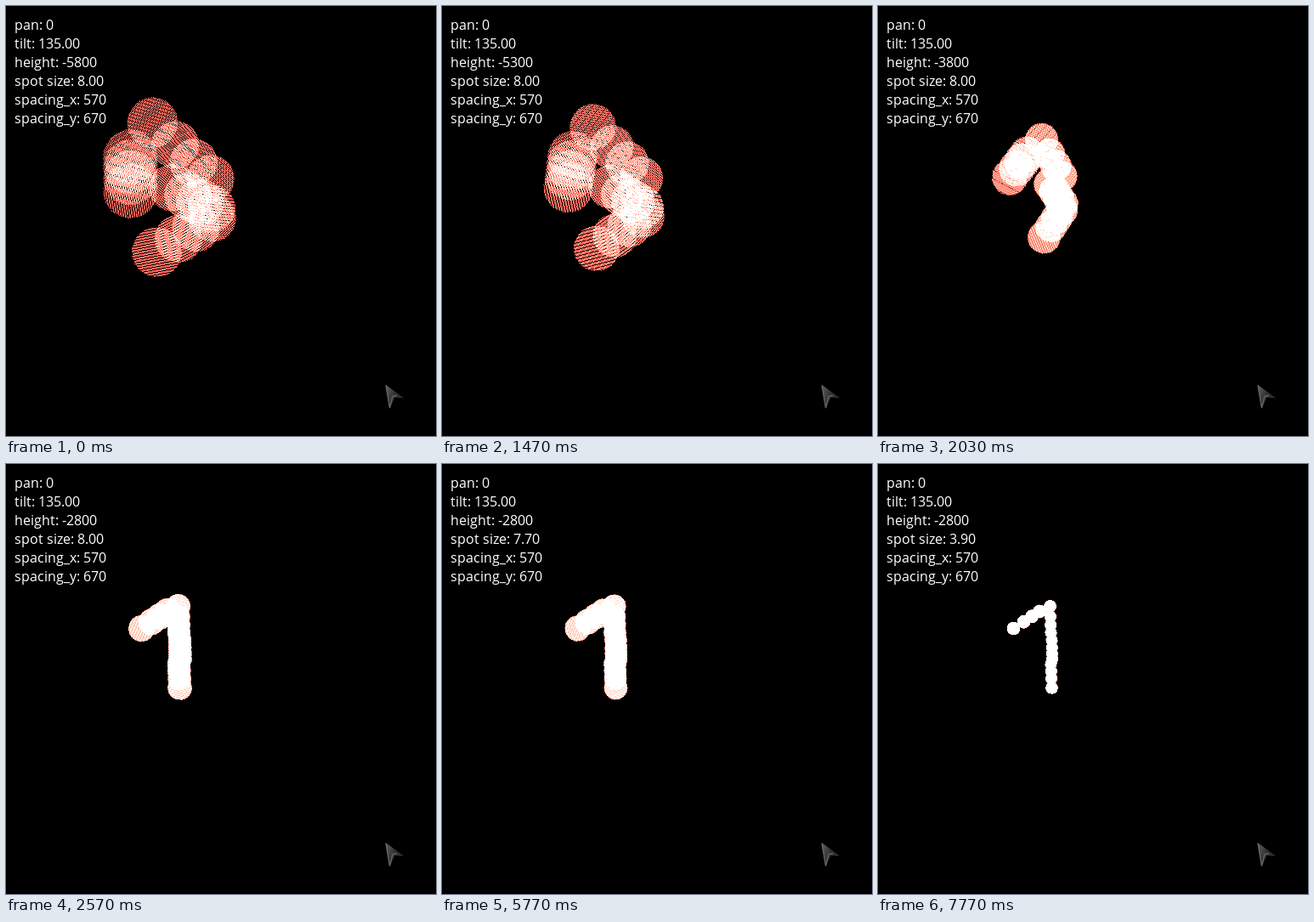
Recreate the animation shown at these times as an HTML page with a canvas. Size 506 by 506 pixels, loop 8000 ms.

```html
<!DOCTYPE html>
<html lang="en">
<head>
<meta charset="utf-8">
<style>
  html, body { margin: 0; width: 100%; height: 100%; overflow: hidden; background: #000; }
  body { position: relative; }
  canvas, svg { position: absolute; left: 0; top: 0; width: 506px; height: 506px; }
  text { font: 16px "Open Sans", "Noto Sans", sans-serif; fill: #fff; white-space: pre; }
</style>
</head>
<body>
<canvas id="beams" width="506" height="506"></canvas>
<svg viewBox="0 0 506 506">
  <defs>
    <linearGradient id="metal" x1="0" y1="0" x2="1" y2="0.6">
      <stop offset="0" stop-color="#666"/>
      <stop offset="0.5" stop-color="#333"/>
      <stop offset="1" stop-color="#2a2a2a"/>
    </linearGradient>
  </defs>
  <g id="labels"></g>
  <path d="M446.5 445.5 L468.5 461.5 L457.5 460.5 L451.5 474 Z" fill="url(#metal)"/>
  <path d="M447 446.5 L451.5 473 L455 459 L460 458.5" fill="none" stroke="#666" stroke-width="1.3"/>
</svg>
<script>
const SIZE = 506, LOOP = 8000;
const GRID = 25, STRETCH = 1.25;
const BEAM = [255, 100, 88];
const FONT = '16px "Open Sans", "Noto Sans", sans-serif';

const clamp = (v, lo, hi) => Math.min(hi, Math.max(lo, v));
const mix = (a, b, k) => a.map((v, i) => v + (b[i] - v) * k);

// Four rows of four spots: ends of each row at height 2800 and at height 5800
const ROWS = [
  { near: [[159, 193], [189.5, 173]], far: [[146, 217], [146, 177]] },
  { near: [[202, 167], [203, 198]], far: [[172, 137], [240, 203]] },
  { near: [[204, 207], [204.5, 229]], far: [[196, 213], [241, 238]] },
  { near: [[204, 263], [203, 235]], far: [[177, 289], [242, 249]] }
];
const SPOTS = ROWS.flatMap(({ near, far }) => [0, 1, 2, 3].map(j => {
  const k = (j / 3) ** 0.85;
  return { near: mix(...near, k), far: mix(...far, k) };
}));

function heightAt(t) {
  const tap = t >= 700 ? 1 : 0;
  const u = clamp((t - 1370) / 1200, 0, 1);
  const held = t < 1370 ? 0 : 1 + Math.round(28 * (1 - (1 - u) ** 1.25));
  const nudge = t >= 2830 && t < 3100 ? 1 : 0;
  return 5800 - 100 * (tap + held + nudge);
}

// Spot size in tenths: one tap up and down, a held key, then four taps
function spotAt(t) {
  if (t < 5665) return t >= 4330 && t < 5000 ? 81 : 80;
  const held = Math.min(36, Math.floor((t - 5660) / 39.5));
  const taps = clamp(Math.floor((t - 7330) / 146) + 1, 0, 4);
  return 79 - held - taps;
}

const ctx = document.getElementById("beams").getContext("2d");
const image = ctx.createImageData(SIZE, SIZE);
const px = image.data;

// Adds a tilted lattice of light points filling one disc
function addSpot([cx, cy], r, angle) {
  const c = Math.cos(angle), s = Math.sin(angle);
  const du = r / GRID * STRETCH, dv = r / GRID / STRETCH;
  const rows = Math.floor(r / dv);
  for (let j = -rows; j <= rows; j++) {
    const v = j * dv, cols = Math.floor(Math.sqrt(r * r - v * v) / du);
    for (let i = -cols; i <= cols; i++) {
      const u = i * du;
      const x = Math.round(cx + u * c - v * s);
      const y = Math.round(cy + u * s + v * c);
      const at = (y * SIZE + x) * 4;
      BEAM.forEach((light, k) => { px[at + k] += light; });
    }
  }
}

const labels = document.getElementById("labels");
const lines = Array.from({ length: 6 }, (_, i) => {
  const el = document.createElementNS("http://www.w3.org/2000/svg", "text");
  el.setAttribute("y", 28 + 22 * i);
  return labels.appendChild(el);
});

// Letters advance by whole pixels
function setLine(el, str) {
  ctx.font = FONT;
  let x = 10;
  const starts = [...str].map(ch => {
    const left = x;
    x += Math.round(ctx.measureText(ch).width);
    return left;
  });
  el.setAttribute("x", starts.join(" "));
  el.textContent = str;
}

function draw(height, spot) {
  for (let i = 0; i < px.length; i += 4) {
    px[i] = px[i + 1] = px[i + 2] = 0;
    px[i + 3] = 255;
  }
  SPOTS.forEach(({ near, far }, i) => {
    const reach = 28 + 0.09 * Math.max(0, 190 - far[0]);
    addSpot(mix(near, far, (height - 2800) / 3000),
      reach * height / 5800 * spot / 80, 0.1 + 0.13 * i);
  });
  ctx.putImageData(image, 0, 0);
  ["pan: 0", "tilt: 135.00", `height: -${height}`, `spot size: ${(spot / 10).toFixed(2)}`,
    "spacing_x: 570", "spacing_y: 670"].forEach((str, i) => setLine(lines[i], str));
}

let shown = "", start = null;
function frame(now) {
  if (start === null) start = now;
  const t = (now - start) % LOOP;
  const height = heightAt(t), spot = spotAt(t), key = height + "/" + spot;
  if (key !== shown) {
    draw(height, spot);
    shown = key;
  }
  requestAnimationFrame(frame);
}
requestAnimationFrame(frame);
</script>
</body>
</html>
```
